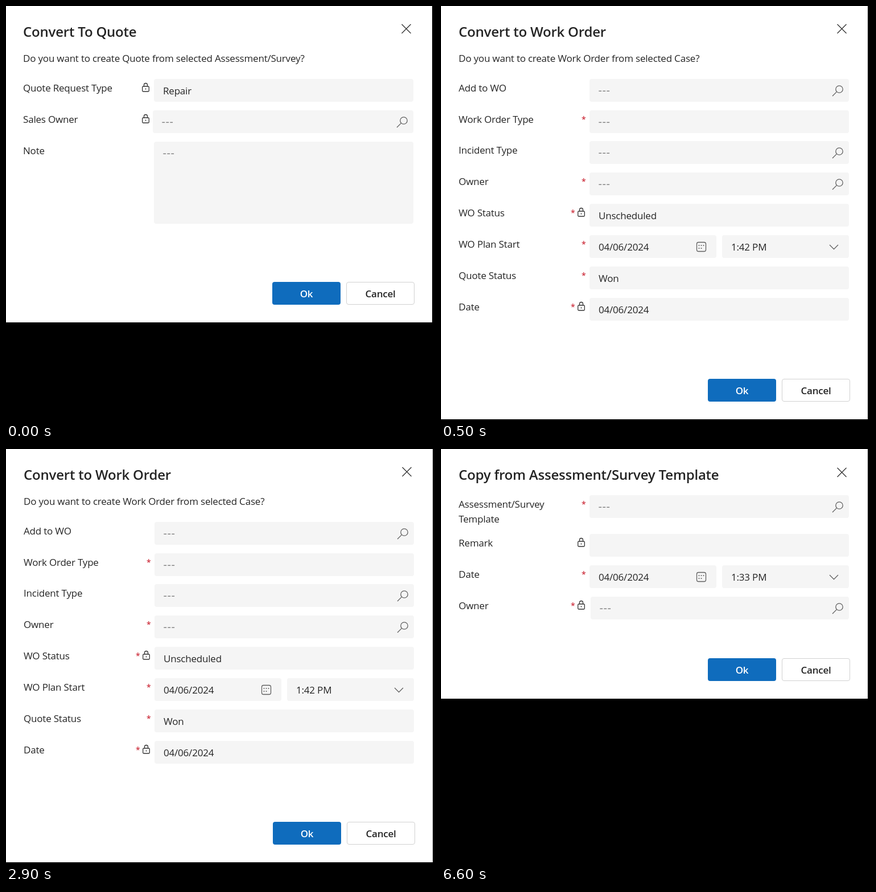
These frames come from a looping animation (754x728 px, 8 s). An HTML page:

```html
<!DOCTYPE html>
<html lang="en">
<head>
<meta charset="utf-8">
<title>Convert dialogs</title>
<style>
html, body { margin: 0; width: 100%; height: 100%; overflow: hidden; background: #000; }
svg { display: block; }
text { font: 17px "Open Sans", "Noto Sans", sans-serif; letter-spacing: -.2px; fill: #242424; }
.title { font-size: 24px; font-weight: 600; }
.button { font-size: 17px; font-weight: 600; text-anchor: middle; }
.empty { font-size: 20px; letter-spacing: .6px; fill: #858585; }
.star { font-size: 14px; fill: #c50f1f; }
.panel { fill: #fff; }
.field { fill: #f5f5f5; }
.icon { fill: none; stroke: #616161; stroke-width: 1.3; }
.dark { stroke: #333; }
.dots { stroke-width: 2; stroke-linecap: round; }
.dialog { visibility: hidden; animation: 8s step-end infinite; }
#quote { animation-name: first; }
#order { animation-name: second; }
#template { animation-name: third; }
@keyframes first { 0% { visibility: visible } 6.25%, 100% { visibility: hidden } }
@keyframes second { 0% { visibility: hidden } 6.25% { visibility: visible } 56.25%, 100% { visibility: hidden } }
@keyframes third { 0% { visibility: hidden } 56.25%, 100% { visibility: visible } }
</style>
</head>
<body>
<svg width="754" height="728" viewBox="0 0 754 728">
  <defs>
    <path id="close" class="icon dark" d="M-8-8 8 8M8-8-8 8"/>
    <g id="search" class="icon"><circle cx="3" cy="-2.5" r="6.2"/><path d="M-1.4 1.9-9 9.5"/></g>
    <path id="chevron" class="icon" d="M-7.5-3.5 0 4 7.5-3.5"/>
    <g id="calendar" class="icon">
      <rect x="-8" y="-8" width="16" height="16" rx="3"/>
      <path class="dots" d="M-4-2.5h.01M0-2.5h.01M4-2.5h.01M-4 2.5h.01M0 2.5h.01"/>
    </g>
    <g id="lock" class="icon dark">
      <rect x="-5.8" y="-2" width="11.6" height="9" rx="1.5"/>
      <path d="M-3-2v-2.5a3 3 0 0 1 6 0V-2"/>
      <path class="dots" d="M0 2.5h.01"/>
    </g>
  </defs>
  <g id="quote" class="dialog" transform="translate(-1)"></g>
  <g id="order" class="dialog"></g>
  <g id="template" class="dialog"></g>
</svg>
<script>
const text = (x, y, value, kind = '') => `<text x="${x}" y="${y}" class="${kind}">${value}</text>`;
const box = (x, y, w, h, kind, rx = 4) =>
  `<rect x="${x}" y="${y}" width="${w}" height="${h}" rx="${rx}" class="${kind}"/>`;
const icon = (name, x, y) => `<use href="#${name}" x="${x}" y="${y}"/>`;

function field(y, value, { x = 261, w = 717 - x, h = 40, mark } = {}) {
  const content = value === '---' ? text(x + 15.5, y + 26.5, value, 'empty') : text(x + 16, y + 27, value);
  const marks = { search: 697, calendar: 457.5, chevron: 690.5 };
  return box(x, y, w, h, 'field') + content + (mark ? icon(mark, marks[mark], y + 20.5) : '');
}

function row(y, label, value, { required, locked, ...options } = {}) {
  return text(31, y + 22, label) +
    (required ? text(locked ? 228 : 247, y + 21, '*', 'star') : '') +
    (locked ? icon('lock', 246.5, y + 15) : '') +
    field(y, value, options);
}

const dateRow = (y, label, time) =>
  row(y, label, '04/06/2024', { required: true, w: 223, mark: 'calendar' }) +
  field(y, time, { x: 494, mark: 'chevron' });

function dialog(id, title, height, closeY, content) {
  const y = height - 71;
  document.getElementById(id).innerHTML =
    box(0, 0, 750, height, 'panel', 0) + text(31, 54, title, 'title') + icon('close', 704.5, closeY) +
    content +
    `<rect x="469" y="${y}" width="120" height="40" rx="4" fill="#0f6cbd"/>` +
    `<rect x="599.5" y="${y + .5}" width="119" height="39" rx="3.5" fill="#fff" stroke="#d1d1d1"/>` +
    `<text x="529" y="${y + 27}" class="button" style="fill:#fff">Ok</text>` +
    text(659, y + 27, 'Cancel', 'button');
}

const search = { mark: 'search' };
const required = { required: true };
const both = { required: true, locked: true };

dialog('quote', 'Convert To Quote', 555, 40,
  text(31, 98, 'Do you want to create Quote from selected Assessment/Survey?') +
  row(128, 'Quote Request Type', 'Repair', { locked: true }) +
  row(183, 'Sales Owner', '---', { locked: true, x: 259, ...search }) +
  row(238, 'Note', '---', { h: 144 }));

dialog('order', 'Convert to Work Order', 725, 40,
  text(31, 98, 'Do you want to create Work Order from selected Case?') +
  row(128, 'Add to WO', '---', search) +
  row(183, 'Work Order Type', '---', required) +
  row(237, 'Incident Type', '---', search) +
  row(292, 'Owner', '---', { ...required, ...search }) +
  row(347, 'WO Status', 'Unscheduled', both) +
  dateRow(402, 'WO Plan Start', '1:42 PM') +
  row(457, 'Quote Status', 'Won', required) +
  row(512, 'Date', '04/06/2024', both));

dialog('template', 'Copy from Assessment/Survey Template', 438, 41,
  row(81, 'Assessment/Survey', '---', { ...required, ...search }) +
  text(31, 129, 'Template') +
  row(149, 'Remark', '', { locked: true }) +
  dateRow(204, 'Date', '1:33 PM') +
  row(259, 'Owner', '---', { ...both, x: 263, ...search }));
</script>
</body>
</html>
```
